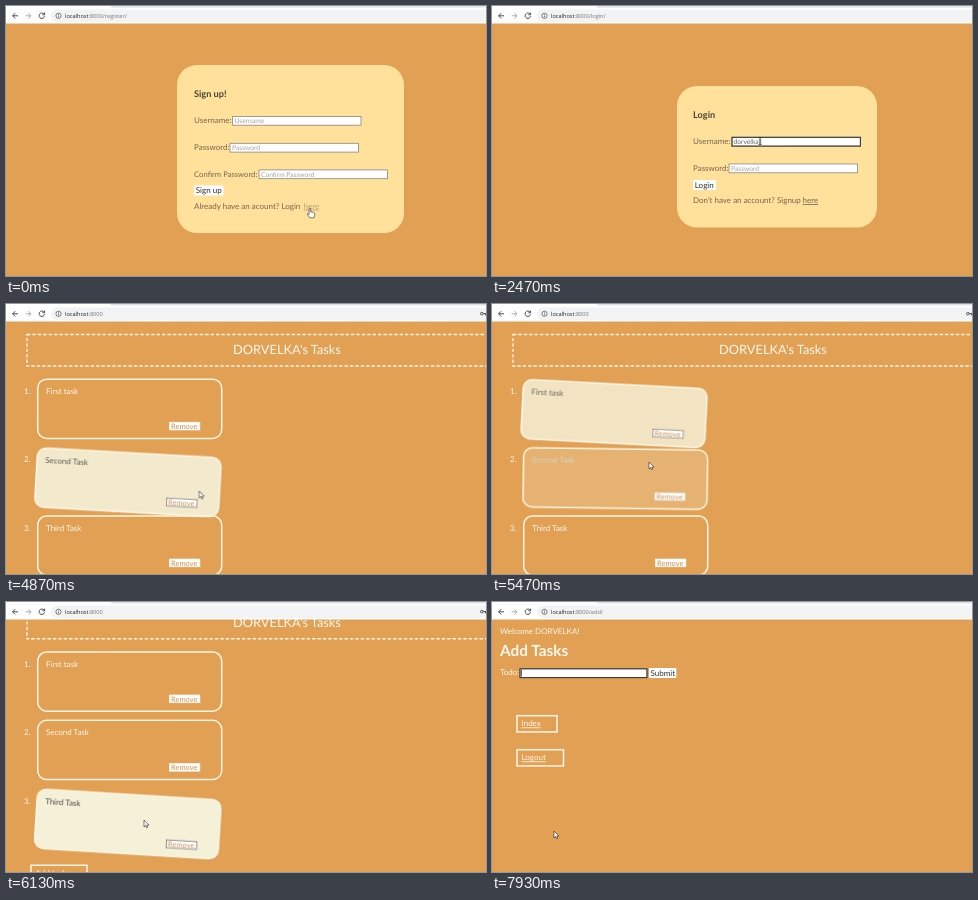
Write an HTML page that moves like this. It is 480 px wide and 270 px high and loops after 8 s.

```html
<!DOCTYPE html>
<html lang="en">
<head>
<meta charset="utf-8">
<title>Task list demo</title>
<style>
html, body { margin: 0; width: 100%; height: 100%; overflow: hidden; background: #e1a054; }
svg { display: block; width: 100vw; height: 100vh; }
text { font: 8px Lato, "Open Sans", sans-serif; text-rendering: geometricPrecision; white-space: pre; }

/* static styles */
.panel { fill: #ffe19b; }
.panel-text text { fill: #75664f; }
.panel-text .head { font-size: 9.2px; font-weight: 700; fill: #4a4338; }
.panel-text .btn { fill: #2c2c2c; }
.panel-text .ph { font-size: 6.7px; fill: #a3a3a3; }
.panel-text .val { font-size: 6.7px; fill: #666; }
.u { text-decoration: underline; }
.in { fill: #fff; stroke: #8d8578; stroke-width: .8; }
.focus { fill: none; stroke: #3a3a3a; stroke-width: 1.1; }
.white { fill: #fff; }
.caret { stroke: #222; stroke-width: .7; }
.menu rect { fill: #fff; stroke: #c9b48a; stroke-width: .6; }
.panel-text .menu text { font: 5.5px "Open Sans", sans-serif; fill: #222; }
.bar text { font: 5.6px "Open Sans", sans-serif; fill: #222; }
.bar .dim { fill: #777; }
.icon { fill: none; stroke: #4a4d51; stroke-width: 1; }
.page text { fill: #fff8ec; }
.page .btn { fill: #333; }
.box { fill: none; stroke: #fff6e6; stroke-width: 1.5; }
.card { color: #fff8ec; fill: rgba(245, 240, 216, 0); }
.card .edge { stroke: #fff6e6; stroke-width: 1.5; }
.card text { fill: currentColor; }
.rm { fill: #fff; stroke: currentColor; stroke-width: .6; }
.card .rm-text, .page .rm-text, .rm-text { font-size: 7.5px; fill: #cd8d55; }

/* hard switches */
.cut { animation: 8s step-end infinite; }
.register { animation-name: register; }
@keyframes register { 0% { opacity: 1 } 8.375%, 100% { opacity: 0 } }
.login { animation-name: login; }
@keyframes login { 0% { opacity: 0 } 8.375% { opacity: 1 } 49.125%, 100% { opacity: 0 } }
.tasks { animation-name: tasks; }
@keyframes tasks { 0% { opacity: 0 } 49.125% { opacity: 1 } 95.875%, 100% { opacity: 0 } }
.add { animation-name: add; }
@keyframes add { 0% { opacity: 0 } 95.875%, 100% { opacity: 1 } }
.stop { animation-name: stop; }
@keyframes stop {
  0% { opacity: 0 } 6.625% { opacity: 1 } 10% { opacity: 0 } 43.375% { opacity: 1 }
  49.125% { opacity: 0 } 95% { opacity: 1 } 95.875%, 100% { opacity: 0 }
}
.reload { animation-name: reload; }
@keyframes reload {
  0% { opacity: 1 } 6.625% { opacity: 0 } 10% { opacity: 1 } 43.375% { opacity: 0 }
  49.125% { opacity: 1 } 95% { opacity: 0 } 95.875%, 100% { opacity: 1 }
}
.key { animation-name: key; }
@keyframes key { 0% { opacity: 0 } 34.125% { opacity: 1 } 95.875%, 100% { opacity: 0 } }
.user-ph { animation-name: userPh; }
@keyframes userPh { 0% { opacity: 1 } 22.5%, 100% { opacity: 0 } }
.pass-ph { animation-name: passPh; }
@keyframes passPh { 0% { opacity: 1 } 34.125%, 100% { opacity: 0 } }
.user-focus { animation-name: userFocus; }
@keyframes userFocus { 0% { opacity: 0 } 15% { opacity: 1 } 31.625%, 100% { opacity: 0 } }
.pass-focus { animation-name: passFocus; }
@keyframes passFocus { 0% { opacity: 0 } 31.625%, 100% { opacity: 1 } }
.menu-all { animation-name: menuAll; }
@keyframes menuAll { 0% { opacity: 0 } 16.625% { opacity: 1 } 22.5%, 100% { opacity: 0 } }
.menu-some { animation-name: menuSome; }
@keyframes menuSome { 0% { opacity: 0 } 22.5% { opacity: 1 } 30.875%, 100% { opacity: 0 } }

/* typing: a cover slides off the value */
.type-user { animation-name: typeUser; }
@keyframes typeUser {
  0% { transform: none } 22.5% { transform: translateX(3.8px) } 24.2% { transform: translateX(7.8px) }
  25.8% { transform: translateX(10.2px) } 26.625% { transform: translateX(13.6px) }
  28.375% { transform: translateX(18.8px) } 29.125%, 100% { transform: translateX(26.5px) }
}
.type-pass { animation-name: typePass; }
@keyframes typePass {
  0% { transform: none } 34.125% { transform: translateX(4.24px) } 35.875% { transform: translateX(6.36px) }
  36.625% { transform: translateX(8.48px) } 38.375% { transform: translateX(10.6px) }
  39.125% { transform: translateX(12.72px) } 40% { transform: translateX(16.96px) }
  41.625%, 100% { transform: translateX(19.1px) }
}

/* hover transitions */
.ease { animation: 8s ease infinite; }
.c1 { animation-name: c1; }
@keyframes c1 {
  0%, 64.5% { transform: none; fill: rgba(245, 240, 216, 0); color: #fff8ec }
  67.3%, 67.9% { transform: rotate(3.5deg); fill: #f5f0d8; color: #4a4a44 }
  71.6%, 100% { transform: none; fill: rgba(245, 240, 216, 0); color: #fff8ec }
}
.c2 { animation-name: c2; }
@keyframes c2 {
  0%, 59%, 65.6%, 67.75%, 76.2%, 100% { transform: none; fill: rgba(245, 240, 216, 0); color: #fff8ec }
  61.9%, 62.2%, 71.5%, 72.5% { transform: rotate(3.5deg); fill: #f5f0d8; color: #4a4a44 }
}
.c3 { animation-name: c3; }
@keyframes c3 {
  0%, 62.1%, 65%, 72.5%, 82.5%, 100% { transform: none; fill: rgba(245, 240, 216, 0); color: #fff8ec }
  63.5% { transform: rotate(1.2deg); fill: rgba(245, 240, 216, .35); color: #d0c8b4 }
  76.2%, 79.75% { transform: rotate(3.5deg); fill: #f5f0d8; color: #4a4a44 }
}
.add-link { fill: #fff8ec; animation-name: addLink; }
@keyframes addLink { 0%, 81.25% { fill: #fff8ec } 85%, 100% { fill: #e3a65e } }
.page .add-link text { fill: inherit; }
.add-box { animation-name: addBox; }
@keyframes addBox { 0%, 81.25% { fill: rgba(247, 238, 216, 0) } 85%, 100% { fill: #f7eed8 } }

.scroll { animation: scroll 8s linear infinite; }
@keyframes scroll {
  0%, 75% { transform: none } 76.625% { transform: translateY(-25px) }
  78% { transform: translateY(-50px) } 79.125%, 100% { transform: translateY(-64px) }
}

/* pointer */
.pointer { animation: move 8s linear infinite; }
@keyframes move {
  0%, 7.5% { transform: translate(304px, 202px) }
  11% { transform: translate(288px, 170px) }
  14.1%, 58.375% { transform: translate(268px, 135px) }
  59.9% { transform: translate(205px, 165px) }
  62% { transform: translate(180px, 212px) }
  63.5% { transform: translate(172px, 216px) }
  64.6% { transform: translate(165px, 138px) }
  66.25% { transform: translate(163px, 115px) }
  67.5% { transform: translate(159px, 140px) }
  68.375%, 69.1% { transform: translate(157px, 158px) }
  72.5% { transform: translate(148px, 211px) }
  76%, 79.75% { transform: translate(138px, 218px) }
  83.375% { transform: translate(62px, 235px) }
  86.625%, 90.5% { transform: translate(51px, 238px) }
  92.5%, 99.12% { transform: translate(59px, 234px) }
  99.125%, 100% { transform: translate(62px, 229px) }
}
.pointer path { stroke: #222; stroke-width: .6; fill: #fff; stroke-linejoin: round; }
.hand { animation-name: hand; }
@keyframes hand { 0% { opacity: 1 } 8.375% { opacity: 0 } 81.6% { opacity: 1 } 99.125%, 100% { opacity: 0 } }
.beam { animation-name: beam; }
@keyframes beam { 0% { opacity: 0 } 14.1% { opacity: 1 } 43.375%, 100% { opacity: 0 } }
.arrow { animation-name: arrow; }
@keyframes arrow {
  0% { opacity: 0 } 8.375% { opacity: 1 } 14.1% { opacity: 0 } 43.375% { opacity: 1 }
  81.6% { opacity: 0 } 99.125%, 100% { opacity: 1 }
}
</style>
</head>
<body>
<svg viewBox="0 0 480 270" preserveAspectRatio="none">
  <defs>
    <g id="remove">
      <rect class="rm" x="132.3" y="43.2" width="30.6" height="7.8"/>
      <text class="rm-text" x="134" y="49.8">Remove</text>
    </g>
  </defs>
  <rect width="480" height="270" fill="#e1a054"/>

  <!-- sign-up form -->
  <g class="cut register panel-text">
    <rect class="panel" x="171" y="59" width="227" height="168" rx="20"/>
    <text class="head" x="188" y="91">Sign up!</text>
    <text x="188" y="117.3">Username:</text>
    <rect class="in" x="226.6" y="110.4" width="128.4" height="8.8"/>
    <text class="ph" x="228.5" y="117">Username</text>
    <text x="188" y="144.2">Password:</text>
    <rect class="in" x="224" y="137.3" width="128.4" height="8.8"/>
    <text class="ph" x="226" y="144">Password</text>
    <text x="188" y="170.8" style="font-size:7.7px">Confirm Password:</text>
    <rect class="in" x="253" y="163.9" width="128.4" height="8.8"/>
    <text class="ph" x="255" y="170.6">Confirm Password</text>
    <rect class="white" x="188" y="179.5" width="29.5" height="10"/>
    <text class="btn" x="189.8" y="187.2">Sign up</text>
    <text x="188" y="202.6">Already have an acount? Login <tspan class="u" x="297.5" fill="#b9a276">here</tspan></text>
  </g>

  <!-- login form -->
  <g class="cut login panel-text">
    <rect class="panel" x="185" y="80" width="200" height="141.5" rx="20"/>
    <text class="head" x="201" y="112">Login</text>
    <text x="201" y="138.3">Username:</text>
    <rect class="in" x="240" y="131.3" width="128.4" height="8.8"/>
    <text class="val" x="241.5" y="138">dorvelka</text>
    <g class="cut type-user"><rect class="white" x="241.4" y="132" width="28" height="7.4"/></g>
    <text class="ph cut user-ph" x="242" y="138">Username</text>
    <g class="cut user-focus">
      <rect class="focus" x="240" y="131.3" width="128.4" height="8.8"/>
      <g class="cut type-user"><path class="caret" d="M241.8 132.5v6.4"/></g>
    </g>
    <text x="201" y="165">Password:</text>
    <rect class="in" x="237" y="158" width="128.4" height="8.8"/>
    <path d="M239.8 162.4h17.1" stroke="#333" stroke-width="1.5" stroke-linecap="round" stroke-dasharray="0 2.12"/>
    <g class="cut type-pass"><rect class="white" x="238.6" y="158.8" width="22" height="7.2"/></g>
    <text class="ph cut pass-ph" x="239" y="164.7">Password</text>
    <g class="cut pass-focus">
      <rect class="focus" x="237" y="158" width="128.4" height="8.8"/>
      <g class="cut type-pass"><path class="caret" d="M238.9 159.2v6.4"/></g>
    </g>
    <rect class="white" x="201" y="174" width="23" height="10"/>
    <text class="btn" x="202.8" y="181.6">Login</text>
    <text x="201" y="197">Don't have an account? Signup <tspan class="u" x="310.5">here</tspan></text>
    <g class="menu cut menu-all">
      <rect x="240" y="141" width="128.4" height="97" rx="1"/>
      <text x="245" y="154.6">34KT0852</text>
      <text x="245" y="169.6">dorvelka</text>
      <text x="245" y="184.6">dorvel@example.com</text>
      <text x="245" y="199.6">2470615</text>
      <text x="245" y="214.6">5550104862</text>
      <text x="245" y="229.6">marblefox408@example.com</text>
    </g>
    <g class="menu cut menu-some">
      <rect x="240" y="141" width="128.4" height="52" rx="1"/>
      <text x="245" y="154.6">dorvelka</text>
      <text x="245" y="169.6">dorvel@example.com</text>
      <text x="245" y="184.6">dorvelka27</text>
    </g>
  </g>

  <!-- task list -->
  <g class="cut tasks page">
    <g class="scroll">
      <rect class="box" x="21" y="30.5" width="520" height="31.5" stroke-dasharray="3.4 2" style="stroke-width:1.3"/>
      <text x="281" y="50" text-anchor="middle" style="font-size:12.8px">DORVELKA's Tasks</text>
      <text x="18" y="90">1.</text>
      <text x="18" y="158.4">2.</text>
      <text x="18" y="226.8">3.</text>
      <g transform="translate(31 75)"><g class="card ease c1">
        <rect class="edge" x=".7" y=".2" width="184" height="59.2" rx="9"/>
        <text x="9" y="14.8" style="fill:currentColor">First task</text>
        <use href="#remove"/>
      </g></g>
      <g transform="translate(31 143.4)"><g class="card ease c2">
        <rect class="edge" x=".7" y=".2" width="184" height="59.2" rx="9"/>
        <text x="9" y="14.8" style="fill:currentColor">Second Task</text>
        <use href="#remove"/>
      </g></g>
      <g transform="translate(31 211.8)"><g class="card ease c3">
        <rect class="edge" x=".7" y=".2" width="184" height="59.2" rx="9"/>
        <text x="9" y="14.8" style="fill:currentColor">Third Task</text>
        <use href="#remove"/>
      </g></g>
      <rect class="box ease add-box" x="25" y="288.5" width="56" height="16.2"/>
      <g class="ease add-link"><text class="u" x="29.5" y="299.2">Add tasks</text></g>
      <rect class="box" x="25" y="322.5" width="46.5" height="16.2"/>
      <text class="u" x="29.5" y="333.2">Logout</text>
    </g>
  </g>

  <!-- new task -->
  <g class="cut add page">
    <text x="8" y="32">Welcome DORVELKA!</text>
    <text x="8" y="54" style="font-size:15.4px;font-weight:700">Add Tasks</text>
    <text x="8" y="73.4">Todo:</text>
    <rect class="in" x="28" y="66.8" width="127" height="8.8"/>
    <rect class="focus" x="28" y="66.8" width="127" height="8.8"/>
    <path class="caret" d="M29.5 68v6.4"/>
    <rect class="white" x="157" y="66" width="27.3" height="10"/>
    <text class="btn" x="158.5" y="73.6">Submit</text>
    <rect class="box" x="25" y="113.7" width="40" height="16.2"/>
    <text class="u" x="29.5" y="124.4">Index</text>
    <rect class="box" x="25" y="147.7" width="46.5" height="16.2"/>
    <text class="u" x="29.5" y="158.4">Logout</text>
  </g>

  <!-- browser bar -->
  <g class="bar">
    <rect class="white" width="480" height="17.5"/>
    <rect x="105" width="375" height="1.6" fill="#dee1e6"/>
    <rect x="45" y="3.6" width="460" height="12.4" rx="6.2" fill="#f1f3f4"/>
    <path class="icon" d="M12 9.8H6.6M9.2 7.2L6.6 9.8l2.6 2.6"/>
    <path class="icon" d="M19.6 9.8H25M22.4 7.2L25 9.8l-2.6 2.6" style="stroke:#a9acb0"/>
    <path class="icon cut reload" d="M37.9 8A2.7 2.7 0 1 0 38.5 10.2M38.6 6.6v2.2h-2.2"/>
    <path class="icon cut stop" d="M33.6 7.5l4.8 4.8M38.4 7.5l-4.8 4.8"/>
    <circle class="icon" cx="52.5" cy="9.8" r="2.6" style="stroke-width:.7"/>
    <path class="icon" d="M52.5 9.4v1.9M52.5 8v.7" style="stroke-width:.7"/>
    <g class="cut key">
      <circle class="icon" cx="475.8" cy="9.6" r="1.3"/>
      <path class="icon" d="M477 9.6h4M479.4 9.6v1.8"/>
    </g>
    <text x="59" y="11.8">localhost<tspan class="dim">:8000</tspan></text>
    <g class="cut register"><text class="dim" x="96.8" y="11.8">/register/</text></g>
    <g class="cut login"><text class="dim" x="96.8" y="11.8">/login/</text></g>
    <g class="cut add"><text class="dim" x="96.8" y="11.8">/add/</text></g>
  </g>

  <g class="pointer">
    <path class="cut arrow" d="M0 0v7l1.6-1.5 1 2.3 1.1-.5-1-2.2h2.2z"/>
    <path class="cut beam" d="M-1.5-3.5h3M0-3.5v7M-1.5 3.5h3" style="fill:none"/>
    <path class="cut hand" d="M-.9.8q0-.8.8-.8t.8.8V3.9q3.6.2 4 1.6V7.8L3.9 9.8H-.1L-2.8 6.2q.3-1.2 1.9 0z"/>
  </g>
</svg>
</body>
</html>
```
